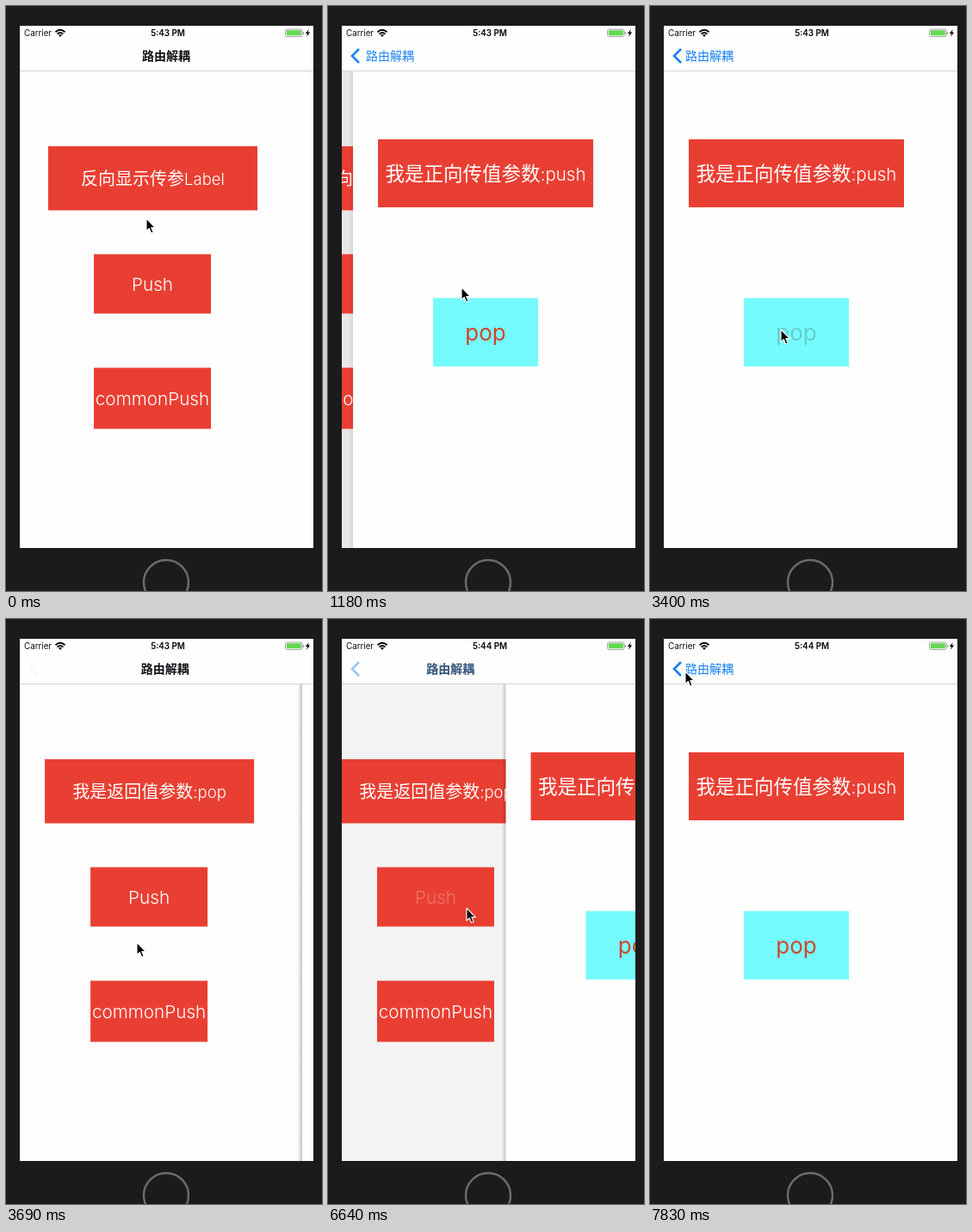
An HTML page that plays this animation: 367 px wide and 680 px high, repeating every 8000 ms.

```html
<!DOCTYPE html>
<html lang="zh-CN">
<head>
<meta charset="utf-8">
<title>路由解耦</title>
<style>
html, body { margin: 0; width: 100%; height: 100%; overflow: hidden; background: #1b1b1b; }
svg { display: block; width: 100%; height: 100%; }
text { font-family: Inter, "Noto Sans CJK SC", "Noto Sans CJK", sans-serif; text-anchor: middle; }
.light { font-weight: 300; fill: #fff; }
.red { fill: #e93f33; }
</style>
</head>
<body>
<svg viewBox="0 0 367 680">
  <defs>
    <clipPath id="body"><rect x="16" y="76" width="341" height="554"/></clipPath>
    <clipPath id="window"><rect width="213" height="680"/></clipPath>
    <linearGradient id="edge">
      <stop offset="0" stop-color="#000" stop-opacity="0"/>
      <stop offset="1" stop-color="#000" stop-opacity=".25"/>
    </linearGradient>
  </defs>

  <rect width="367" height="680" fill="#1b1b1b"/>
  <circle cx="186" cy="670" r="26" fill="none" stroke="#6c6c6c" stroke-width="2.4" clip-path="url(#window)"/>
  <rect x="16" y="23" width="341" height="607" fill="#fefefe"/>

  <g clip-path="url(#body)">
    <rect id="shade" x="16" y="76" width="341" height="554"/>
    <g id="home">
      <rect class="red" x="49" y="163" width="243" height="74.5"/>
      <text class="light" x="170.5" y="207.5" font-size="20"><tspan id="cjk"></tspan><tspan id="latin" font-size="18.5"></tspan></text>
      <rect class="red" x="102" y="288.5" width="136" height="69"/>
      <text class="light" id="push" x="170" y="331" font-size="20.7">Push</text>
      <rect class="red" x="102" y="420.5" width="136" height="71"/>
      <text class="light" x="170" y="464" font-size="20.7">commonPush</text>
    </g>
    <g id="detail">
      <rect id="shadow" x="11" y="76" width="5" height="554" fill="url(#edge)"/>
      <rect x="16" y="76" width="341" height="554" fill="#fefefe"/>
      <rect class="red" x="45" y="155" width="250" height="79"/>
      <text class="light" x="170" y="202.5" font-size="22.5">我是正向传值参数<tspan font-size="20.5">:push</tspan></text>
      <rect x="109" y="339.5" width="122" height="79.5" fill="#75fbfd"/>
      <text id="pop" x="170" y="389" font-size="26">pop</text>
    </g>
  </g>

  <path d="M16 75.5H357" stroke="#d4d4d6"/>
  <path id="chevron" d="M36 50L28 58L36 66" fill="none" stroke="#1580f8" stroke-width="2.6"/>
  <text id="title" y="63" font-size="14" font-weight="700" fill="#111">路由解耦</text>
  <text id="back" y="63" font-size="14" fill="#1580f8">路由解耦</text>

  <text x="21" y="35" font-size="9.8" fill="#111" style="text-anchor:start">Carrier</text>
  <g fill="none" stroke="#000" stroke-width="1.9">
    <path d="M57.5 30.2Q63 25.4 68.5 30.2M59.6 32.6Q63 29.6 66.4 32.6"/>
    <path d="M61 33.8Q63 32.4 65 33.8L63 36Z" fill="#000" stroke="none"/>
  </g>
  <text id="clock" x="188" y="35" font-size="9.8" font-weight="600" fill="#000"></text>
  <rect x="324.5" y="27" width="19.5" height="8.6" rx="2" fill="none" stroke="#8d8d8d" stroke-width=".8"/>
  <rect x="325.8" y="28.3" width="17" height="6" rx="1" fill="#65d854"/>
  <path d="M345.2 30V33" stroke="#8d8d8d" stroke-width="1.1"/>
  <path d="M351.8 27L347.8 32H350.2L349 35.8L353.2 30.5H350.7Z" fill="#000"/>

  <path id="cursor" d="M0 0V14.6L3.3 11.5L5.6 17L8.1 16L5.8 10.6H10.3Z" stroke="#fff" stroke-width="1.1" stroke-linejoin="round"/>
</svg>
<script>
const LOOP = 8000, TICK = 147.7, LAST = 53;
const WIDTH = 341, PARALLAX = 102;
const PUSH_1 = 6 * TICK + 18, POP = 23 * TICK + 18, PUSH_2 = 45 * TICK - 82;

// cursor waypoints: tick, x, y
const PATH = [
  [0, 163, 247], [1, 159, 292], [2, 155, 327], [11, 155, 327], [12, 160, 302],
  [13, 182, 240], [14, 198, 196], [15, 204, 179], [16, 190, 230], [17, 165, 330],
  [18, 152, 376], [26, 152, 376], [30, 176, 215], [34, 222, 208], [37, 215, 220],
  [38, 215, 220], [41, 166, 375], [42, 158, 386], [43, 161, 336], [48, 161, 336],
  [52, 41, 64], [53, 41, 61]
];

const el = {};
document.querySelectorAll("[id]").forEach(e => el[e.id] = e);
const set = (e, name, value) => e.setAttribute(name, value);
const clamp = v => Math.min(1, Math.max(0, v));

// critically damped spring, 0 to 1
function spring(ms) {
  const u = Math.max(0, ms) * 0.01826;
  const left = (1 + u) * Math.exp(-u);
  return left < 0.002 ? 1 : 1 - left;
}

function progress(t) {
  if (t >= PUSH_2) return spring(t - PUSH_2);
  if (t >= POP) return 1 - spring(t - POP);
  return spring(t - PUSH_1);
}

// a tapped button's title dims, then fades back
function tapAlpha(t, start) {
  return t < start - 20 ? 1 : 0.2 + 0.8 * clamp((t - start - 50) / 400);
}

function cursorAt(k) {
  const i = Math.max(1, PATH.findIndex(p => p[0] >= k));
  const [a, ax, ay] = PATH[i - 1], [b, bx, by] = PATH[i];
  const f = (k - a) / (b - a);
  return [ax + (bx - ax) * f, ay + (by - ay) * f];
}

function draw(ms) {
  const k = Math.min(LAST, Math.floor((ms + 8) / TICK));
  const t = k * TICK;
  const p = progress(t), q = 1 - p;
  const returned = t >= POP;

  set(el.home, "transform", `translate(${-PARALLAX * p})`);
  set(el.detail, "transform", `translate(${WIDTH * q})`);
  set(el.detail, "visibility", p > 0 ? "visible" : "hidden");
  set(el.shadow, "opacity", clamp(0.25 + q));
  const gray = Math.round(254 - 24 * p);
  set(el.shade, "fill", `rgb(${gray},${gray},${gray})`);

  el.cjk.textContent = returned ? "我是返回值参数" : "反向显示传参";
  el.latin.textContent = returned ? ":pop" : "Label";
  set(el.push, "opacity", tapAlpha(t, t < POP ? PUSH_1 : PUSH_2));

  const popAlpha = t < POP - 20 || t >= PUSH_2 ? 1 : tapAlpha(t, POP);
  set(el.pop, "opacity", popAlpha);
  set(el.pop, "fill", popAlpha < 0.3 ? "#222" : "#d2452f");

  // the title slides left and becomes the back label
  const slide = p + p * q * (0.36 * p - 0.77 * q);
  const x = 186 - 117 * slide;
  set(el.title, "x", x);
  set(el.back, "x", x);
  set(el.title, "opacity", clamp(1 - p * p * 1.1));
  set(el.back, "opacity", p);
  set(el.chevron, "opacity", p);

  el.clock.textContent = k < 34 ? "5:43 PM" : "5:44 PM";
  set(el.cursor, "transform", `translate(${cursorAt(k)})`);
}

function frame() {
  draw(performance.now() % LOOP);
  requestAnimationFrame(frame);
}
frame();
</script>
</body>
</html>
```
